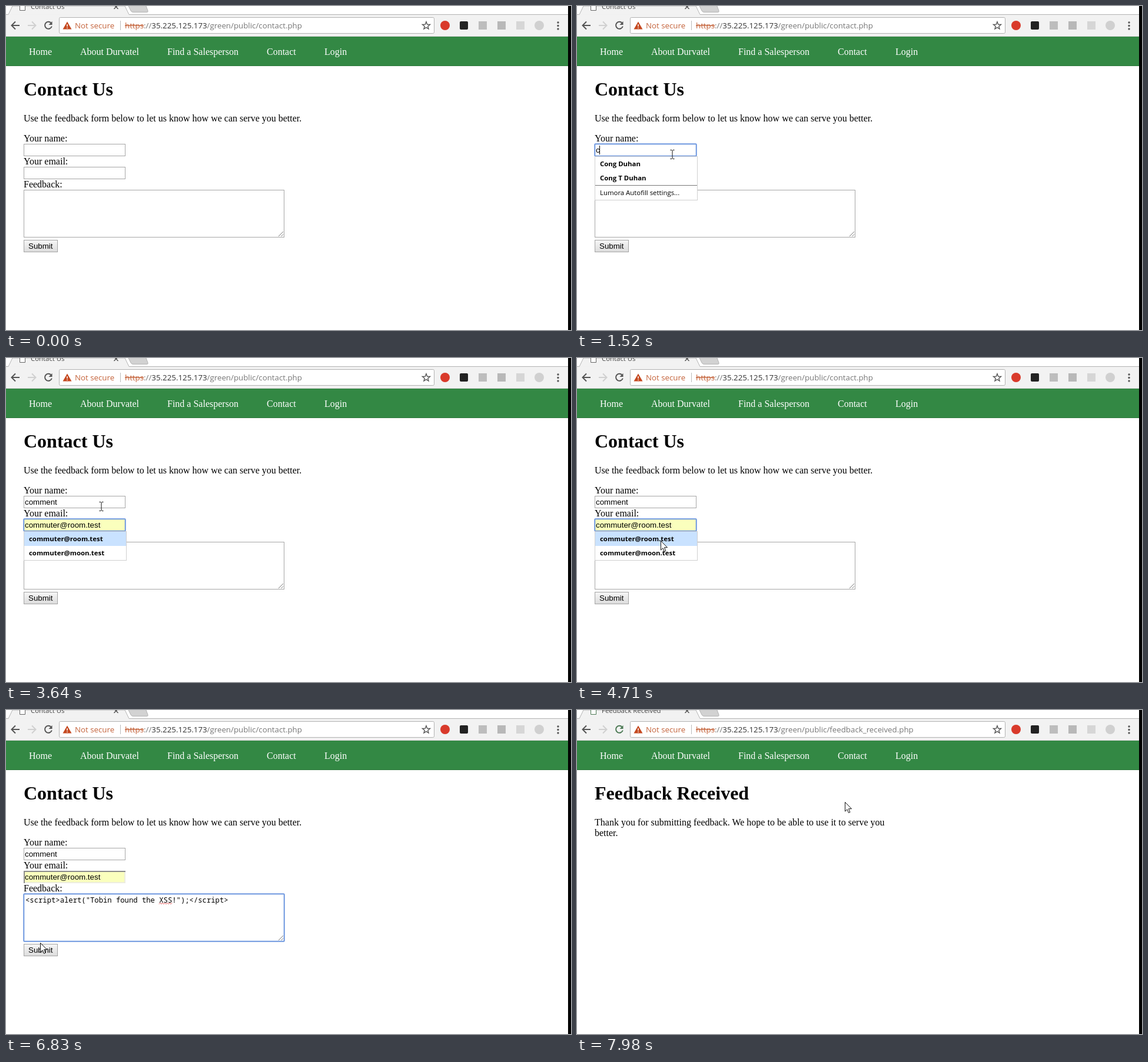
Animation, 960 px wide and 550 px high, one loop 8 s. Source, as an HTML page:

```html
<!DOCTYPE html>
<html lang="en">
<head>
<meta charset="utf-8">
<title>Contact form</title>
<style>
  html, body { margin: 0; width: 100%; height: 100%; overflow: hidden; background: #fff; }
  svg { display: block; width: 960px; height: 550px; }
  text { white-space: pre; }
  .serif { font: 16px "Liberation Serif", "Times New Roman", serif; }
  .title { font: bold 32px "Liberation Serif", "Times New Roman", serif; }
  .field { font: 13.33px "Liberation Sans", Arial, sans-serif; }
  .ui { font: 13.3px "Open Sans", "Noto Sans", sans-serif; }
  .tab { font: 11.4px "Open Sans", "Noto Sans", sans-serif; }
  .option { font: bold 11.4px "Open Sans", "Noto Sans", sans-serif; }
  .code { font: 12.22px "Noto Sans Mono", "DejaVu Sans Mono", monospace; }
  .box { fill: #fff; stroke: #a6a6a6; }
  .ring { fill: none; stroke: #6d97df; stroke-width: 2; }
  .line { fill: none; stroke: #555; stroke-width: 2; }
</style>
</head>
<body>
<svg id="stage" viewBox="0 0 960 550">
  <defs>
    <linearGradient id="face" x2="0" y2="1">
      <stop stop-color="#f6f6f6"/><stop offset="1" stop-color="#dcdcdc"/>
    </linearGradient>
  </defs>
  <rect width="960" height="550" fill="#fff"/>

  <g id="browser">
    <rect y="14" width="955" height="38" fill="#f2f2f2"/>
    <path d="M0 14.5H4L11 0H202L209 14.5H955" fill="#f2f2f2" stroke="#b3b3b3"/>
    <path d="M208 0L212 8Q213 10.5 216 10.5H239Q242 10.5 241 8L238 0" fill="#d2d2d2" stroke="#b3b3b3"/>
    <path id="page" d="M23.5 -4V7.5H32.5V-4" fill="#fff" stroke="#666"/>
    <text id="tabTitle" class="tab" x="42" y="5" fill="#444"></text>
    <path d="M183.5 -2L190.5 5M190.5 -2L183.5 5" class="line" style="stroke-width:1.5"/>
    <path d="M23 33H10M16 26.5L9.5 33L16 39.5" class="line"/>
    <path d="M37 33H50M44 26.5L50.5 33L44 39.5" class="line" style="stroke:#d0d0d0"/>
    <g id="reload">
      <path d="M76.5 28.7A6 6 0 1 0 77.8 34.5" class="line"/>
      <path d="M78.5 26V32H72.5Z" fill="#555"/>
    </g>
    <path id="stop" d="M67 28L77 38M77 28L67 38" class="line"/>
    <rect x="90.5" y="19.5" width="637" height="27" rx="2" class="box" style="stroke:#b2b2b2"/>
    <path d="M104 26.5L111.5 39.5H96.5Z" fill="#c5481f"/>
    <path d="M104 31V35M104 36.5V38" stroke="#fff" stroke-width="1.5"/>
    <text class="ui" x="117" y="38" fill="#c4633b">Not secure</text>
    <path d="M194.5 25V41" stroke="#bbb"/>
    <text class="ui" x="202" y="38" fill="#777"><tspan fill="#c4633b" text-decoration="line-through">https</tspan>://<tspan fill="#333">35.225.125.173</tspan><tspan id="path"></tspan></text>
    <path id="star" fill="none" stroke="#555" stroke-width="1.4"/>
    <circle cx="746" cy="33" r="8" fill="#d93a2b"/>
    <rect x="771" y="26" width="14" height="14" rx="2" fill="#222"/>
    <rect x="803" y="26" width="14" height="14" fill="#bdbdbd"/>
    <rect x="835" y="26" width="14" height="14" fill="#b8b8b8"/>
    <rect x="867" y="26" width="14" height="14" fill="#d6d6d6"/>
    <circle cx="906" cy="33" r="8" fill="#d0d0d0"/>
    <g fill="#555"><circle cx="938" cy="28" r="1.7"/><circle cx="938" cy="33.5" r="1.7"/><circle cx="938" cy="39" r="1.7"/></g>
    <path d="M0 51.5H955" stroke="#d5d5d5"/>
    <rect y="52" width="955" height="50" fill="#338844"/>
    <path d="M0 101.5H955" stroke="#2d793c"/>
    <g class="serif" fill="#fff">
      <text x="39" y="83">Home</text><text x="126" y="83">About Durvatel</text>
      <text x="274" y="83">Find a Salesperson</text><text x="443" y="83">Contact</text>
      <text x="541" y="83">Login</text>
    </g>
  </g>

  <g id="form">
    <text class="title" x="30" y="152">Contact Us</text>
    <g class="serif">
      <text x="30" y="196">Use the feedback form below to let us know how we can serve you better.</text>
      <text x="30" y="230">Your name:</text>
      <text x="30" y="269">Your email:</text>
      <text x="30" y="308">Feedback:</text>
    </g>
    <rect class="box" x="30.5" y="234.5" width="172" height="20"/>
    <rect class="box" id="emailBox" x="30.5" y="273.5" width="172" height="20"/>
    <g id="inset" fill="none" stroke-width="2">
      <path d="M31 293H202V274" stroke="#ededdf"/><path d="M31 294V274H203" stroke="#8c8c8c"/>
    </g>
    <rect class="box" x="30.5" y="312.5" width="442" height="80"/>
    <path d="M463 391L471 383M467.5 391L471 387.5" stroke="#777"/>
    <rect class="ring" id="nameRing" x="30.25" y="234.25" width="172.5" height="20.5" rx="1"/>
    <rect class="ring" id="emailRing" x="30.25" y="273.25" width="172.5" height="20.5" rx="1"/>
    <rect class="ring" id="noteRing" x="30.25" y="312.25" width="442.5" height="80.5" rx="1"/>
    <text class="field" id="name" x="32" y="249"></text>
    <text class="field" id="email" x="32" y="288"></text>
    <text class="code" id="note" x="33" y="327"></text>
    <path id="squiggle" fill="none" stroke="#e04a4a"/>
    <rect id="button" x="30.5" y="397.5" width="57" height="20" fill="url(#face)" stroke="#a4a4a4"/>
    <text class="field" x="38" y="412">Submit</text>
    <rect class="ring" id="buttonRing" x="30.25" y="397.25" width="57.5" height="20.5" rx="1"/>
    <rect id="caret" width="1" height="15"/>

    <g id="nameMenu">
      <rect x="30.5" y="255.5" width="174" height="74" fill="#fff" stroke="#cfcfcf"/>
      <path d="M31 304.5H204" stroke="#777"/>
      <text class="option" x="39" y="272">Cong Duhan</text>
      <text class="option" x="39" y="296">Cong T Duhan</text>
      <text class="tab" x="39" y="321">Lumora Autofill settings...</text>
    </g>
    <g id="emailMenu">
      <rect id="emailMenuBox" x="30.5" y="294.5" width="174" height="49" fill="#fff" stroke="#cfcfcf"/>
      <rect id="picked" x="31" y="295" width="173" height="24" fill="#c9e2ff"/>
      <text class="option" x="39" y="311">commuter@room.test</text>
      <text class="option" x="39" y="335">commuter@moon.test</text>
      <text class="option" id="third" x="39" y="359">cloud@room.test</text>
    </g>
  </g>

  <g id="received">
    <text class="title" x="30" y="152">Feedback Received</text>
    <text class="serif" x="30" y="196">Thank you for submitting feedback. We hope to be able to use it to serve you</text>
    <text class="serif" x="30" y="214">better.</text>
  </g>

  <g id="mouse">
    <path id="arrow" d="M.5 .5V16L4 12.7L6.5 18.5L8.9 17.5L6.5 11.7H11.5Z" fill="#fff" stroke="#111"/>
    <path id="beam" d="M-3.5 -7.5H-1L0 -6.5L1 -7.5H3.5M0 -6.5V6.5M-3.5 7.5H-1L0 6.5L1 7.5H3.5" fill="none" stroke="#111"/>
  </g>
  <rect x="955" width="5" height="550" fill="#000"/>
</svg>
<script>
const LOOP = 8000;
const EMAIL = 'commuter@room.test';
const NOTE = '<script>alert("Tobin found the XSS!");<\/script>';
const el = {};
document.querySelectorAll('[id]').forEach(node => { el[node.id] = node; });

// Times at which each letter of a field appears
const NAME_KEYS = [1520, 1750, 1850, 1960, 2060, 2210, 2300];
const EMAIL_KEYS = [2520, 2610, 2710, 2800];
const NAME_FOCUS = 1000, EMAIL_FOCUS = 2390, PICK = 3640, CLOSE = 4890;
const NOTE_FOCUS = 5070, PASTE = 6040, PRESS = 7110, LOAD = 7200, DONE = 7620;

// Mouse moves: start, end, then the point reached
const MOVES = [
  [70, 580, 165, 259], [740, 940, 162, 252],
  [4050, 4370, 541, 206], [4370, 4710, 142, 310],
  [4890, 5070, 166, 330], [5350, 5580, 205, 337],
  [6040, 6640, 56, 405], [6640, 6830, 58, 395], [6830, 6930, 59, 402],
  [7620, 7980, 455, 156]
];

const show = (node, on) => node.setAttribute('display', on ? 'inline' : 'none');
const within = (t, from, to) => t >= from && t < to;
const typed = (keys, t) => keys.filter(k => k <= t).length;
const latest = (keys, t, start) => Math.max(start, ...keys.filter(k => k <= t));
const setText = (node, text) => { if (node.textContent !== text) node.textContent = text; };

function mouseAt(t) {
  let x = 720, y = 560;
  for (const [start, end, toX, toY] of MOVES) {
    if (t < start) break;
    const step = Math.floor((Math.min(t, end) - start) / 45) * 45;
    const p = t >= end ? 1 : step / (end - start);
    const ease = p * p * (3 - 2 * p);
    x += (toX - x) * ease;
    y += (toY - y) * ease;
  }
  return [Math.round(x), Math.round(y)];
}

function drawMouse(t, menuOpen) {
  const [x, y] = mouseAt(t);
  const inRow = top => x > 30 && x < 203 && y > top && y < top + 21;
  const inNote = x > 30 && x < 473 && y > 312 && y < 393 && !menuOpen;
  const beam = t < DONE && (inRow(234) || inRow(273) || inNote);
  el.mouse.setAttribute('transform', `translate(${x} ${y})`);
  show(el.mouse, t >= 120);
  show(el.beam, beam);
  show(el.arrow, !beam);
  const hover = x > 30 && x < 88 && y > 397 && y < 418;
  el.button.setAttribute('stroke', hover ? '#858585' : '#a4a4a4');
}

function drawCaret(t) {
  let node = null, since = 0, x = 32, y = 237;
  if (within(t, NAME_FOCUS, EMAIL_FOCUS)) {
    node = el.name;
    since = latest(NAME_KEYS, t, 1040);
  } else if (within(t, EMAIL_FOCUS, PICK)) {
    node = el.email;
    since = latest(EMAIL_KEYS, t, EMAIL_FOCUS);
    y = 276;
  } else if (within(t, NOTE_FOCUS, PRESS)) {
    node = el.note;
    since = t < PASTE ? NOTE_FOCUS : PASTE;
    x = 33;
    y = 315;
  }
  const blinkOn = t - since < 510;
  show(el.caret, node && blinkOn);
  if (!node) return;
  const width = node.textContent ? node.getComputedTextLength() : 0;
  el.caret.setAttribute('x', Math.floor(x + width));
  el.caret.setAttribute('y', y);
}

function render(t) {
  const done = t >= DONE;
  const emailCount = typed(EMAIL_KEYS, t);
  const picked = t >= PICK;
  const emailMenu = emailCount > 0 && t < CLOSE;
  const third = emailCount < 3;

  show(el.form, !done);
  show(el.received, done);
  setText(el.tabTitle, done ? 'Feedback Received' : 'Contact Us');
  setText(el.path, `/green/public/${done ? 'feedback_received' : 'contact'}.php`);
  const loading = within(t, LOAD, DONE + 90);
  show(el.stop, loading);
  show(el.reload, !loading);
  const tint = done ? '#4d7a55' : '#555';
  el.reload.children[0].style.stroke = tint;
  el.reload.children[1].setAttribute('fill', tint);
  el.page.setAttribute('stroke', done ? '#4d7a55' : '#666');

  setText(el.name, 'comment'.slice(0, typed(NAME_KEYS, t)));
  setText(el.email, picked ? EMAIL : EMAIL.slice(0, emailCount));
  setText(el.note, t >= PASTE ? NOTE : '');
  show(el.squiggle, t >= PASTE);
  el.emailBox.style.fill = picked ? '#faffbd' : '#fff';
  show(el.inset, t >= NOTE_FOCUS);

  show(el.nameRing, within(t, NAME_FOCUS, EMAIL_FOCUS));
  show(el.emailRing, within(t, EMAIL_FOCUS, NOTE_FOCUS));
  show(el.noteRing, within(t, NOTE_FOCUS, PRESS));
  show(el.buttonRing, t >= PRESS);

  show(el.nameMenu, within(t, NAME_KEYS[0], NAME_KEYS[1]));
  show(el.emailMenu, emailMenu);
  show(el.picked, picked);
  show(el.third, third);
  el.emailMenuBox.setAttribute('height', third ? 73 : 49);

  drawCaret(t);
  drawMouse(t, emailMenu);
}

const starPoint = (_, i) => {
  const r = i % 2 ? 2.9 : 6.8, a = (i / 5 - 0.5) * Math.PI;
  return `${(714 + r * Math.cos(a)).toFixed(1)} ${(33.5 + r * Math.sin(a)).toFixed(1)}`;
};
el.star.setAttribute('d', 'M' + Array.from({ length: 10 }, starPoint).join('L') + 'Z');
el.squiggle.setAttribute('d', 'M260 329.5' + 'l2 -2l2 2'.repeat(5) + 'l2 -2');

const begin = performance.now();
function tick() {
  render((performance.now() - begin) % LOOP);
  requestAnimationFrame(tick);
}
tick();
</script>
</body>
</html>
```
